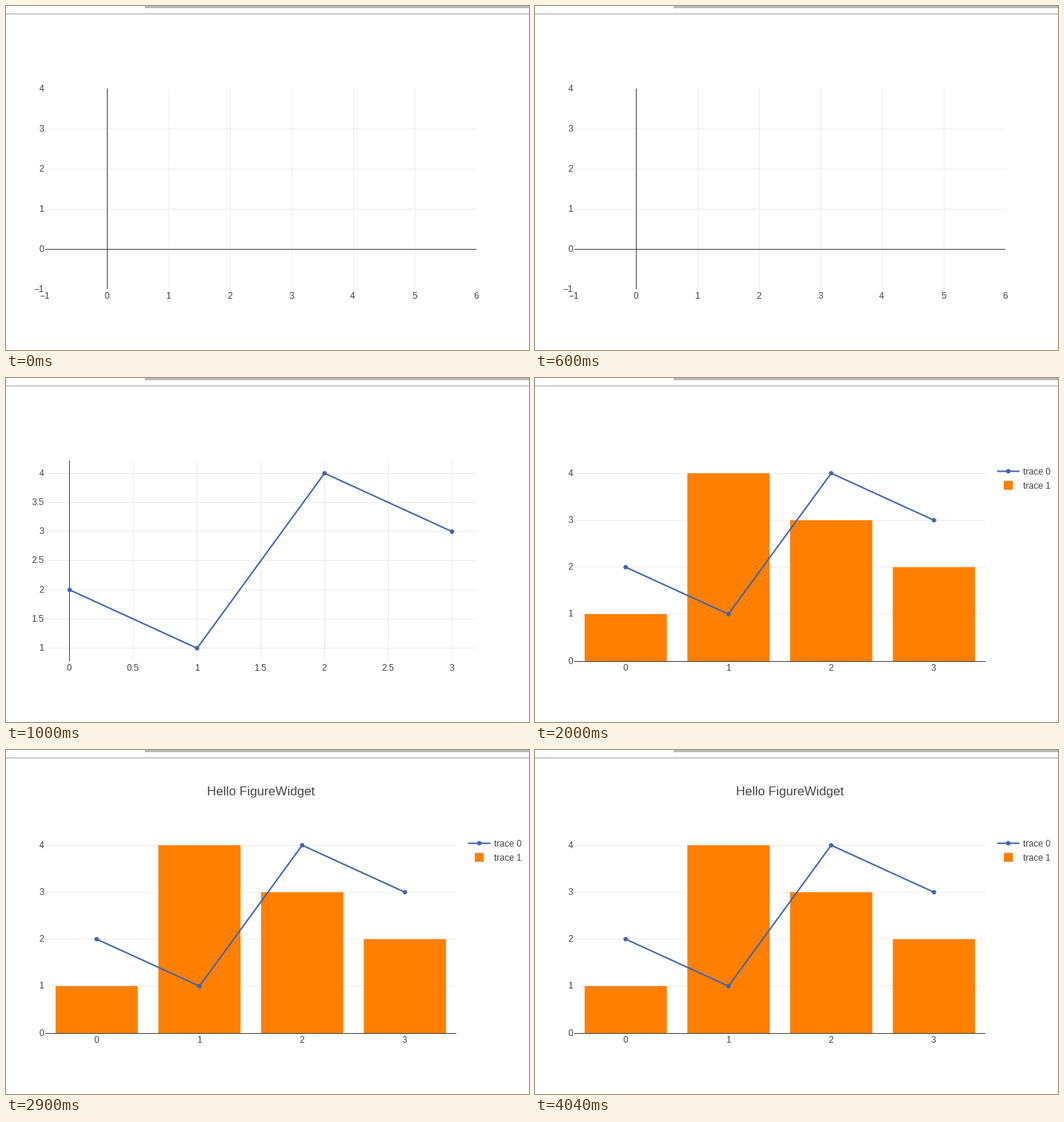
A matplotlib script for the animation above (4.8 s loop, 705x463 px).

```python
import matplotlib.pyplot as plt
from matplotlib.animation import FuncAnimation
from matplotlib.lines import Line2D
from matplotlib.patches import Circle, Rectangle

W, H, DPI = 705, 463, 64
PT = 72 / DPI                       # points per pixel
STEP, LOOP = 100, 4800              # ms
GRID, INK = "#ececec", "#444444"
BLUE, ORANGE = "#3f66ae", "#ff7f00"
LEFT, RIGHT, TOP, BOTTOM = 53, 634, 111, 381
LINE_Y = [2, 1, 4, 3]
BAR_Y = [1, 4, 3, 2]

plt.rcParams["font.family"] = "Liberation Sans"
plt.rcParams["toolbar"] = "None"

fig = plt.figure(figsize=(W / DPI, H / DPI), dpi=DPI, facecolor="white")
ax = fig.add_axes([0, 0, 1, 1])
ax.set_xlim(0, W)
ax.set_ylim(H, 0)
ax.axis("off")


def box(x, y, w, h, color, z=1, crisp=True):
    return ax.add_patch(Rectangle((x, y), w, h, fc=color, lw=0, zorder=z,
                                  aa=not crisp, snap=crisp))


def label(x, y, text, ha="left", size=12):
    return ax.text(x, y, text, ha=ha, va="baseline", color=INK,
                   fontsize=size * PT, zorder=6)


def tick_text(v):
    return f"{v:g}".replace("-", "\u2212")


def x_labels(ticks, to_x):
    return [label(to_x(v) - 0.5, 394, tick_text(v), "center") for v in ticks]


def y_labels(ticks, to_y):
    return [label(51, int(to_y(v)) + 4, tick_text(v), "right") for v in ticks]


def v_lines(ticks, to_x):
    return [box(int(to_x(v)), TOP, 1, BOTTOM - TOP, INK if v == 0 else GRID,
                2 if v == 0 else 1) for v in ticks]


def h_lines(ticks, to_y, right=RIGHT):
    return [box(LEFT, int(to_y(v)), right - LEFT, 1, INK if v == 0 else GRID,
                4 if v == 0 else 1) for v in ticks]


def trace(xs, ys, dots=None):
    line = Line2D(xs, ys, color=BLUE, lw=2 * PT, zorder=5, snap=False,
                  solid_capstyle="butt")
    ax.add_line(line)
    dots = dots or zip(xs, ys)
    return [line] + [ax.add_patch(Circle(p, 3, fc=BLUE, lw=0, zorder=5))
                     for p in dots]


def empty_chart():
    def to_x(v): return 136 + 83 * v
    def to_y(v): return 327 - 54 * v
    return (v_lines(range(6), to_x) + h_lines(range(4), to_y)
            + x_labels(range(-1, 7), to_x) + y_labels(range(-1, 5), to_y))


def line_chart():
    def to_x(v): return 85.8 + 171.8 * v
    def to_y(v): return 442.2 - 78.5 * v
    xt = [k / 2 for k in range(7)]
    yt = [1 + k / 2 for k in range(7)]
    return (v_lines(xt, to_x) + h_lines(yt, to_y)
            + x_labels(xt, to_x) + y_labels(yt, to_y)
            + trace([to_x(k) for k in range(4)], [to_y(v) for v in LINE_Y]))


def bar_chart():
    def to_x(v): return 122.25 + 138.5 * v
    def to_y(v): return 381 - 63.2 * v
    parts = h_lines(range(5), to_y, 607)
    parts += x_labels(range(4), to_x) + y_labels(range(5), to_y)
    for k, v in enumerate(BAR_Y):
        parts.append(box(to_x(k) - 55.4, to_y(v), 110.8, 63.2 * v,
                         ORANGE, 3, crisp=False))
    parts += trace([to_x(k) for k in range(4)], [to_y(v) for v in LINE_Y])
    # legend
    parts += trace([623, 653], [125.5, 125.5], [(638, 125.5)])
    parts.append(box(632, 138.5, 12, 12, ORANGE, 3, crisp=False))
    parts += [label(658, 130, "trace 0"), label(658, 149, "trace 1")]
    return parts


# page edges above the chart
box(187, 0, W - 187, 3, "#b9b9b9")
box(0, 10, W, 1, "#b4b4b4")
box(0, 11, W, 1, "#e6e6e6")

# (artists, first ms shown, ms hidden again)
SCENES = [
    (empty_chart(), 0, 1000),
    (line_chart(), 1000, 2000),
    (bar_chart(), 2000, LOOP),
    ([label(271, 61, "Hello FigureWidget", size=17)], 2900, LOOP),
]


def draw(i):
    t = i * STEP
    for parts, start, end in SCENES:
        for part in parts:
            part.set_visible(start <= t < end)
    return []


anim = FuncAnimation(fig, draw, frames=LOOP // STEP, init_func=lambda: draw(0),
                     interval=STEP, repeat=True, repeat_delay=0, blit=False)
plt.show()
```
